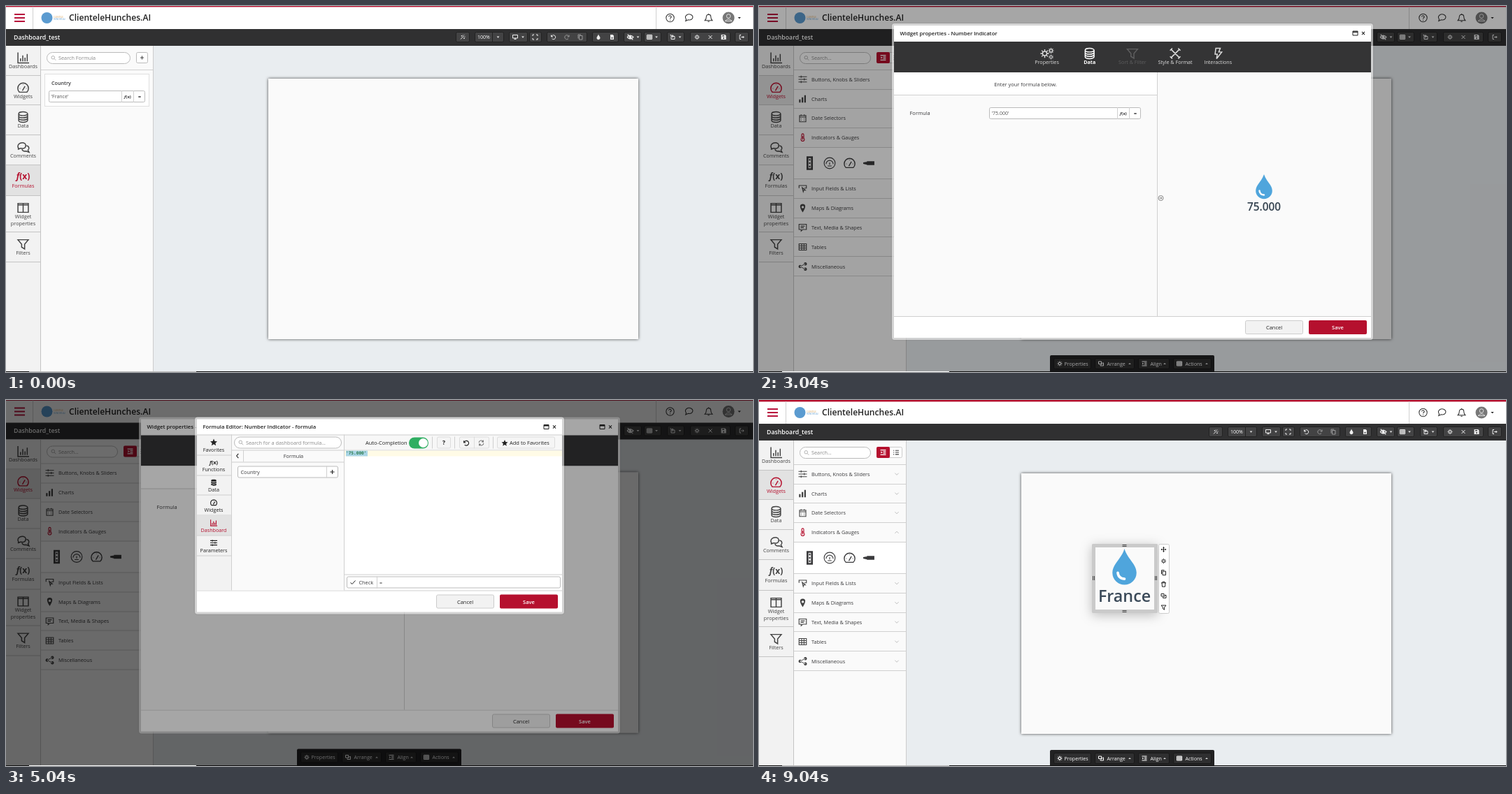
An HTML page that plays this animation: 1068 by 524 pixels, repeating every 10 s.

```html
<!DOCTYPE html>
<html lang="en">
<head>
<meta charset="utf-8">
<title>Dashboard formula</title>
<style>
  html, body { margin: 0; width: 100%; height: 100%; overflow: hidden; }
  svg { display: block; width: 1068px; height: 524px; font-family: "Open Sans", sans-serif; white-space: pre; }
  .mono { font-family: "DejaVu Sans Mono", monospace; }
</style>
</head>
<body>
<svg id="stage" viewBox="0 0 1068 524"></svg>
<script>
const RED = '#b5102e', INK = '#3a3a3c', LINE = '#d0d0d0', GREY = '#8a8a8a';

// Icons are drawn in a 16 x 16 box; a leading "*" means filled.
const ICONS = {
  chart: 'M1 1V15H16M4.5 13V9M7.5 13V5M10.5 13V8M13.5 13V3',
  bars: '*M1 9H4V15H1ZM6 5H9V15H6ZM11 1H14V15H11Z',
  gauge: 'M3 14A7.2 7.2 0 1 1 13 14ZM7 12L10.5 6M3.5 9H4M8 3.5V4M12 9H12.5',
  db: 'M2 3.5a6 2.5 0 1 0 12 0a6 2.5 0 1 0-12 0V12.5a6 2.5 0 0 0 12 0V3.5M2 6.5a6 2.5 0 0 0 12 0M2 9.5a6 2.5 0 0 0 12 0',
  dbFill: '*M2 3C2 .5 14 .5 14 3V4.5C14 6.500 2 6.500 2 4.500ZM2 6.300C4 8 12 8 14 6.300V9C14 11 2 11 2 9ZM2 10.800C4 12.500 12 12.500 14 10.800V13.500C14 16 2 16 2 13.500Z',
  comments: 'M2 10C-3 3 10-1 11.500 5C12 10 7 10.500 5 9.500L1 11ZM12.500 6C17 7 16 11 14.500 12L16 15L12 13.500C9 14 7 13 6.500 11',
  chat: 'M2.500 10.500C-2 4 6 0 11 2.500C17 6 13 13 6 11.500L1.500 13.500Z',
  columns: 'M1 2H15V14H1ZM8 2V14M1 4H15',
  filter: 'M1 2H15L10 8V14.500L6 12V8Z',
  search: 'M2 6.500a4.500 4.500 0 1 0 9 0a4.500 4.500 0 1 0-9 0M10 10L14.500 14.500',
  gear: 'M4.500 8a3.500 3.500 0 1 0 7 0a3.500 3.500 0 1 0-7 0M8 1V4M8 12V15M1 8H4M12 8H15M3 3L5 5M11 11L13 13M13 3L11 5M5 11L3 13',
  wand: 'M2 14L11 5M9 2V4M13 7H15M13 2L12 3M5 3V6M3.500 4.500H6.500M12 10V13M10.500 11.500H13.500',
  caret: '*M3 5.500H13L8 11Z',
  caretUp: '*M3 10.500H13L8 5Z',
  monitor: 'M1 2H15V11H1ZM8 11V14M5 14H11',
  expand: 'M1 5V1H5M11 1H15V5M15 11V15H11M5 15H1V11',
  undo: 'M2 2V7H7M2.500 7A6 6 0 1 1 4 12.500',
  redo: 'M14 2V7H9M13.500 7A6 6 0 1 0 12 12.500',
  refresh: 'M2 7A6 6 0 0 1 13 4.500V1M13 5H9M14 9A6 6 0 0 1 3 11.500V15M3 11H7',
  copy: 'M5 4H14V15H5ZM2 12V1H10',
  drop: '*M8 0C10 5 13 7 13 10.500C13 17 3 17 3 10.500C3 7 6 5 8 0Z',
  image: '*M3 1H10L13 4V15H3ZM5 12H11L9 8L7 10L6 9Z',
  eye: 'M1 8Q8 0 15 8Q8 16 1 8M6 8a2 2 0 1 0 4 0a2 2 0 1 0-4 0M2 2L14 14',
  table: 'M1 2H15V14H1ZM1 6H15M1 10H15M6 2V14M10.500 2V14',
  share: 'M5 6H14V14H4V2H1M8 10V3M5.500 5L8 2L10.500 5',
  close: 'M3 3L13 13M13 3L3 13',
  save: '*M1 1H12L15 4V15H1ZM4 3V6H10V3ZM8 9a2 2 0 1 0 .1 0Z',
  exit: 'M6 2H2V14H6M6 8H14M11 5L14 8L11 11',
  help: 'M1 8a7 7 0 1 0 14 0a7 7 0 1 0-14 0M5.500 6C6 3 11 4 10 7Q8 8 8 9.500M8 11.500V12.500',
  bell: 'M1.500 12.500Q4 10 4 6.500A4 4.500 0 0 1 12 6.500Q12 10 14.500 12.500ZM6.500 14.500H9.500M8 .5V2',
  sliders: 'M0 3H16M0 8H16M0 13H16M5 1V5M11 6V10M5 11V15',
  calendar: 'M2 3H14V15H2ZM2 6H14M5 1V4M11 1V4M5 9H6M10 9H11M5 12H6M10 12H11',
  thermo: 'M6 9V2.500a2 2 0 0 1 4 0V9a3.200 3.200 0 1 1-4 0M8 5V12',
  input: 'M1 7V2H15V7H11M7 6L13 11L10 11L9 14Z',
  pin: '*M8 0C15 0 14 7 8 16C2 7 1 0 8 0ZM8 3.500a2.300 2.300 0 1 0 .1 0Z',
  note: 'M1 2H15V12H8L5 15V12H1ZM4 5.500H12M4 8.500H10',
  nodes: '*M3 5a3 3 0 1 0 .1 0ZM13 0a3 3 0 1 0 .1 0ZM13 10a3 3 0 1 0 .1 0ZM3 7.400L13 2.400V3.600L4 8L13 12.400V13.600L3 8.600Z',
  list: 'M1 3H3M6 3H15M1 8H3M6 8H15M1 13H3M6 13H15',
  indent: 'M1 2H15M8 6H15M8 10H15M1 14H15M2 6L5 8L2 10',
  down: 'M2 5L8 11L14 5', up: 'M2 11L8 5L14 11', right: 'M5 1L11 8L5 15', left: 'M11 1L5 8L11 15',
  plus: 'M8 1V15M1 8H15',
  bolt: 'M5 1H11L9 6H13L6 15L7 9H4Z',
  tools: 'M2 2L14 14M14 2L2 14M1 4L4 1M12 15L15 12M12 1L15 4M1 12L4 15M5 11L11 5',
  star: '*M8 0L10.300 5.500L16 6L11.700 9.800L13 15.500L8 12.500L3 15.500L4.300 9.800L0 6L5.700 5.500Z',
  check: 'M1 9L6 13L15 3',
  window: 'M1 2H15V14H1ZM1 4H15M1 5H15',
  sort: 'M4 1V14M1 11L4 14L7 11M10 2H14M10 6H14M10 10H14L10 14H14',
  goto: 'M1 8a7 7 0 1 0 14 0a7 7 0 1 0-14 0M4 8H11M8 5L11 8L8 11',
  move: 'M8 1V15M1 8H15M6 3L8 1L10 3M6 13L8 15L10 13M3 6L1 8L3 10M13 6L15 8L13 10',
  trash: 'M1 4H15M5 4V1H11V4M3 4L4 15H12L13 4',
  layers: 'M1 2H9V9H1ZM6 11V14H15V6H11M9 11L12 8',
  light: 'M5 0H11V16H5ZM7 3.500H9M7 8H9M7 12.500H9',
  dial: 'M1 8a7 7 0 1 0 14 0a7 7 0 1 0-14 0M3.500 9A4.500 4.500 0 0 1 12.500 9M5.500 11.500H10.500M8 7V10',
  pen: '*M0 7L5 6V10L0 9ZM5 5.500H15V10.500H5Z'
};

function icon(name, cx, cy, size = 9, color = INK, weight = 1.5) {
  const d = ICONS[name], k = size / 16, solid = d[0] === '*';
  return `<path transform="translate(${cx - size / 2} ${cy - size / 2}) scale(${k})" d="${solid ? d.slice(1) : d}" ` +
    (solid ? `fill="${color}" fill-rule="evenodd"/>` : `fill="none" stroke="${color}" stroke-width="${weight}"/>`);
}
function box(x1, y1, x2, y2, fill, stroke, r = 0, more = '') {
  const o = stroke ? .5 : 0;
  return `<rect x="${x1 + o}" y="${y1 + o}" width="${x2 - x1 - 2 * o}" height="${y2 - y1 - 2 * o}" rx="${r}" fill="${fill}" ${stroke ? `stroke="${stroke}"` : ''} ${more}/>`;
}
const hLine = (x1, x2, y, c = LINE) => box(x1, y, x2, y + 1, c);
const vLine = (x, y1, y2, c = LINE) => box(x, y1, x + 1, y2, c);
// cy is the middle of the capital letters
function text(x, cy, s, size = 7.3, fill = INK, weight = 400, anchor = 'start', more = '') {
  return `<text x="${x}" y="${cy + size * .36}" font-size="${size}" fill="${fill}" font-weight="${weight}" text-anchor="${anchor}" ${more}>${s}</text>`;
}
const mid = (x, cy, s, size, fill, weight) => text(x, cy, s, size, fill, weight, 'middle');
const fx = (x, cy, size, color = INK) => mid(x, cy, '<tspan font-style="italic">f</tspan>(x)', size, color, 700);
const search = (x1, y1, x2, hint, fill = '#fff') =>
  box(x1, y1, x2, y1 + 17, fill, '#bbb', 8) + icon('search', x1 + 10, y1 + 8.5, 8, GREY, 1.3) + text(x1 + 17, y1 + 8.5, hint, 7.3, GREY);

function formulaInput(x1, y, x2, value) {
  return box(x1, y, x2 + 33, y + 17, '#fff', '#bbb', 2) + vLine(x2 - 1, y, y + 17) + vLine(x2 + 16, y, y + 17) +
    text(x1 + 3.5, y + 8.5, value, 7, '#555') + fx(x2 + 8, y + 8.5, 6) + mid(x2 + 25, y + 8.5, '=', 7, INK, 700);
}

function header() {
  const light = '#eee';
  let s = box(0, 0, 1068, 34, '#fff') + box(0, -2, 1068, 1.4, RED) + vLine(38, 1, 33) + vLine(929, 1, 33);
  for (const y of [11, 16, 21]) s += box(12, y, 27, y + 2, '#b8143c');
  s += '<circle cx="58.500" cy="17" r="8" fill="#5b9bd0"/>' + text(68, 15.5, 'CLIENTELE', 2.8, '#dba45c') + text(68, 19, 'HUNCHES.AI', 2.8, '#5b9bd0') +
    text(90, 17, 'ClienteleHunches.AI', 12.1, '#222', 600) +
    icon('help', 949.5, 17, 13, '#333', 1.3) + icon('chat', 977, 17, 13, '#333', 1.3) + icon('bell', 1004.5, 17, 13, '#333', 1.3) +
    '<circle cx="1033" cy="17" r="8.500" fill="#777"/><circle cx="1033" cy="14.500" r="2.800" fill="none" stroke="#ddd"/><path d="M1028 21.500Q1033 16 1038 21.500Z" fill="none" stroke="#ddd"/>' +
    icon('caret', 1048.5, 17, 7, '#222');
  s += box(0, 33, 1068, 57, '#303031') + text(11, 44.5, 'Dashboard_test', 8.75, '#fff', 600);
  for (const [a, b] of [[643, 663], [670, 712], [719, 746], [748, 766], [773, 831], [838, 876], [883, 909], [912, 937], [945, 970], [978, 1036], [1042, 1062]])
    s += box(a, 37, b, 52, '#434344', '#222', 2);
  s += text(674, 44.5, '100%', 7, '#fff') + vLine(695, 38, 51, '#222');
  const tools = { wand: 653, monitor: 728, expand: 756.5, undo: 782.5, redo: 802, copy: 821, drop: 847, image: 866.5, eye: 892.5, table: 920, share: 953, gear: 988, close: 1007, save: 1026, exit: 1052 };
  for (const name in tools) s += icon(name, tools[name], 44.5, name === 'eye' ? 10 : 8, /redo|copy/.test(name) ? '#999' : light, 2);
  for (const x of [703.5, 739, 903.5, 930, 963.5]) s += icon('caret', x, 44.5, 6, light);
  return s;
}

function sidebar(active) {
  const items = [['Dashboards', 'chart', 57, 100], ['Widgets', 'gauge', 100, 142], ['Data', 'db', 142, 185], ['Comments', 'comments', 185, 228],
    ['Formulas', '', 228, 272], ['Widget', 'columns', 272, 324], ['Filters', 'filter', 324, 367]];
  let s = box(0, 57, 50, 524, '#f2f2f2');
  for (const [name, glyph, a, b] of items) {
    const on = name === active, c = on ? RED : '#444';
    if (on) s += box(0, a, 50, b, '#e2e2e2');
    s += hLine(0, 50, b - 1, '#c4c4c4') + (glyph ? icon(glyph, 24.5, a + 17, 17, c, 1.4) : fx(24.5, a + 16, 12, c)) + mid(24.5, a + 29.3, name, 7.3, c);
  }
  return s + mid(24.5, 311, 'properties', 7.3, '#444') + vLine(49, 57, 524, '#c4c4c4');
}

function formulaPanel() {
  return search(58, 66, 178, 'Search Formula') + box(186, 66, 203, 82, '#fff', '#bbb', 2) + icon('plus', 194.5, 74, 6, INK, 2.5) + hLine(50, 211, 91) +
    box(55, 97, 205, 144, '#fff', '#e0e0e0') + text(65, 110, 'Country', 7.2, INK, 600) + formulaInput(61, 121, 166, "'France'");
}

function widgetPanel() {
  const rows = [['sliders', 'Buttons, Knobs &amp; Sliders', 105], ['bars', 'Charts', 133], ['calendar', 'Date Selectors', 160.5], ['thermo', 'Indicators &amp; Gauges', 188.5],
    ['input', 'Input Fields &amp; Lists', 261.5], ['pin', 'Maps &amp; Diagrams', 289.5], ['note', 'Text, Media &amp; Shapes', 317], ['table', 'Tables', 345], ['nodes', 'Miscellaneous', 373]];
  let s = search(58, 66, 160, 'Search...') + box(168, 66, 205, 82, '#fff', '#ccc', 2) + box(168, 66, 187, 82, RED, null, 2) +
    icon('indent', 177.5, 74, 9, '#fff', 2) + icon('list', 196, 74, 9, INK, 2) + box(50, 203, 211, 247, '#fff');
  for (const y of [91, 119, 146, 174, 202, 247, 275, 303, 330, 358, 386]) s += hLine(50, 211, y);
  for (const [glyph, name, y] of rows) {
    const open = glyph === 'thermo';
    s += icon(glyph, 62.5, y, 12, open ? RED : '#444') + text(75, y, name) + icon(open ? 'up' : 'down', 197, y, 7, '#999', 1.4);
  }
  return s + icon('light', 72.5, 225, 17, INK, 2.5) + icon('dial', 101, 225, 18, INK, 1) + icon('gauge', 129.5, 225, 17, INK, 1.3) + icon('pen', 157.5, 225, 17);
}

function bottomBar() {
  let s = box(416, 500, 651, 526, '#222223', null, 2);
  for (const [a, b, glyph, name] of [[421, 475, 'gear', 'Properties'], [480, 537, 'layers', 'Arrange'], [542, 587, 'indent', 'Align'], [592, 647, 'table', 'Actions']])
    s += box(a, 504, b, 520, '#2f2f30', '#191919', 2) + icon(glyph, a + 9, 512, 8, '#fff', 2) + text(a + 15.5 + (a > 475 ? 2 : 0), 512, name, 7.1, '#fff') +
      (a > 475 ? icon('caretUp', b - 7, 512, 6, '#ddd') : '');
  return s;
}

const waterDrop = (x, y, k) => `<g transform="translate(${x} ${y}) scale(${k})"><path d="M0 0C3 10 11.800 15 11.800 23.500A11.800 11.800 0 0 1-11.800 23.500C-11.800 15-3 10 0 0Z" fill="#4fa5dc"/><path d="M-6.500 23.500Q-6 29 0 29.500" fill="none" stroke="#fff" stroke-width="2.500" stroke-linecap="round"/></g>`;

function widget() {
  let s = box(476, 205, 570, 304, '#c9c9c9', null, 2, 'filter="url(#soft)"') + box(476, 205, 570, 304, '#cacaca', null, 2) + box(481, 210, 565, 299, '#fafafa') +
    waterDrop(522.5, 212, 1.46) + mid(522.5, 280, 'France', 23.3, '#3b4a59', 600) + box(571, 205, 587, 305, '#fff', '#ccc', 2);
  for (const y of [206, 208, 300, 302]) s += hLine(519.5, 525.5, y, '#444');
  for (const x of [477, 479, 566, 568]) s += vLine(x, 251, 257, '#444');
  ['move', 'gear', 'copy', 'trash', 'layers', 'filter'].forEach((g, i) => s += icon(g, 578.5, 213 + i * 16.6, 8, '#222', 2));
  return s;
}

function frame(x1, y1, x2, y2, title) {
  return box(x1 - 3, y1 - 3, x2 + 3, y2 + 3, 'rgba(255,255,255,.55)', null, 4, 'filter="url(#edge)"') + box(x1, y1, x2, y2, '#fff') +
    text(x1 + 8.5, 39, title, 7.7, '#222', 600) + icon('window', x2 - 22.5, 39, 8, '#222', 2) + icon('close', x2 - 11, 39, 6.5, '#222', 2.5) +
    hLine(x1, x2, y2 - 31) + box(x2 - 180, y2 - 25, x2 - 97, y2 - 5, '#f2f2f2', '#ccc', 2) + mid(x2 - 138.5, y2 - 14.5, 'Cancel', 7.5, '#222') +
    box(x2 - 89, y2 - 25, x2 - 6, y2 - 5, RED, null, 2) + mid(x2 - 47.5, y2 - 14.5, 'Save', 7.5, '#fff', 600);
}

function dataBody() {
  return box(193, 95, 569, 444, '#fff') + box(199, 100, 354, 118, '#fff', '#bbb', 2) + vLine(336, 100, 118) + text(206, 109, 'Select a Datasource...', 6.9, GREY) +
    icon('dbFill', 344.5, 109, 8) + box(358, 100, 376, 118, '#fff', '#ccc', 2) + icon('gear', 367, 109, 8, INK, 2) +
    search(199, 129, 337, 'Search...', '#eee') + box(342, 129, 376, 146, '#fff', '#ccc', 2) + box(342, 129, 359, 146, '#d3667f', null, 2) +
    icon('list', 350.5, 137.5, 8, '#fff', 2) + icon('sort', 367, 137.5, 8, INK, 1.7) + hLine(193, 381, 151) + hLine(193, 381, 418) +
    box(196, 422, 378, 441, '#fafafa', '#ccc', 2) + mid(287, 431.5, 'Add Calculated Column', 7.7, '#777') +
    vLine(381, 95, 444) + mid(475, 103.5, 'Values', 7.3, INK, 600) + hLine(381, 569, 111) + mid(475, 278.5, 'Drop quantities, amounts, and values here.', 7.1, GREY);
}

function formulaBody(value) {
  return box(193, 95, 569, 128, '#fff') + hLine(193, 569, 127) + mid(381, 112, 'Enter your formula below.', 7.4) +
    text(215.5, 153.5, 'Formula', 7.5) + formulaInput(329, 145, 513, value);
}

function propertiesDialog({ data, value, shown }) {
  let s = frame(193, 28, 875, 475, 'Widget properties - Number Indicator') + box(193, 51, 875, 95, '#343435') + box(193, 95, 875, 444, '#fafafa');
  [['Properties', 'gear'], ['Data', 'db'], ['Sort &amp; Filter', 'filter'], ['Style &amp; Format', 'tools'], ['Interactions', 'bolt']].forEach(([name, glyph], i) => {
    const x = 411.5 + i * 61.2, c = ['#ddd', '#fff', '#5e5e5f'][i < 3 ? i : 0];
    s += (i ? icon(glyph, x, 68, 17, c, 1.4) : icon(glyph, x - 3, 68, 14, c, 1.6) + icon(glyph, x + 6, 64, 9, c, 2) + icon(glyph, x + 6, 73, 8, c, 2)) +
      mid(x, 80.5, name, 7.2, c, i === 1 ? 700 : 400);
  });
  return s + (data ? dataBody() : formulaBody(value)) + vLine(569, 95, 444) + icon('goto', 574.5, 275, 8, '#666', 1.6) +
    waterDrop(722, 241, 1) + mid(722, 287, shown, 15.4, '#34424f', 600);
}

function editorDialog({ list, added, checked }) {
  let s = frame(273, 28, 795, 304, 'Formula Editor: Number Indicator - formula') + box(273, 50, 323, 273, '#f2f2f2') + box(323, 50, 484, 273, '#fafafa') + box(484, 50, 795, 72, '#f7f7f7');
  ['Favorites:star', 'Functions:', 'Data:dbFill', 'Widgets:gauge', 'Dashboard:chart', 'Parameters:sliders'].forEach((item, i) => {
    const [name, glyph] = item.split(':'), y = 50 + i * 28.8, c = i === 4 ? RED : '#222';
    if (i === 4) s += box(273, y, 322, y + 29, '#e2e2e2');
    s += hLine(273, 322, Math.round(y + 28.8)) + (glyph ? icon(glyph, 297, y + 11, 10, c, 1.8) : fx(297, y + 11, 7.5, c)) + mid(297, y + 21.5, name, 7.2, c);
  });
  s += hLine(273, 795, 50) + vLine(322, 50, 273) + vLine(483, 50, 273) + search(326, 53, 480, 'Search for a dashboard formula...');
  s += list
    ? hLine(323, 484, 72) + hLine(323, 484, 89) + vLine(339, 72, 89) + icon('left', 331, 80.5, 7, '#222', 2.5) + mid(411, 80.5, 'Formula', 7.3) +
      box(331, 95, 475, 112, '#fff', '#bbb', 2) + vLine(458, 95, 112) + text(335.5, 103.5, 'Country', 7.3) + icon('plus', 466.5, 103.5, 7, '#222', 2.5)
    : text(331, 84, 'Formulas', 7.3) + icon('right', 466, 84, 7, '#222', 2.5) + hLine(331, 475, 92);
  s += text(514, 61.5, 'Auto-Completion', 7.5, '#222') + box(576, 54, 604, 70, '#2fae62', null, 8) + '<circle cx="596.500" cy="62" r="6.500" fill="#fff"/>' +
    box(616, 53, 636, 70, '#f5f5f5', '#ddd', 2) + mid(626, 61.5, '?', 8.5, '#222', 700) + box(648, 53, 691, 70, '#f5f5f5', '#ddd', 2) + vLine(669, 53, 70, '#ddd') +
    icon('undo', 658, 62, 9, '#222', 2) + icon('refresh', 679.5, 62, 9, '#777', 2) + box(702, 53, 785, 70, '#f5f5f5', '#ddd', 2) +
    icon('star', 713, 62, 9, '#222') + text(720, 61.5, 'Add to Favorites', 7.5, '#222');
  for (const x of [609, 641, 696]) s += vLine(x, 53, 70);
  s += hLine(484, 795, 72) + box(484, 73, 795, 81, '#fffbe6');
  const code = added
    ? `<tspan fill="#2d5c88">DashboardFormula</tspan>(<tspan fill="#2f8a3c">'Country'</tspan>)`
    : `'75.000'`;
  s += (added ? vLine(585, 73, 80, '#333') : box(486, 73, 517, 81, '#a9d5e6')) + text(486, 76.7, code, 6.12, added ? '#333' : '#2a7a4a', 700, 'start', 'class="mono"');
  return s + hLine(484, 795, 250) + box(487, 253, 793, 270, '#fff', '#bbb', 2) + vLine(530, 253, 270) + icon('check', 496, 261.5, 8, '#222', 2) +
    text(504.5, 262, 'Check', 7.3) + text(534, 262, checked ? '= France' : '=', 7, '#222');
}

const FILTERS = `<defs>
  <filter id="page" x="-5%" y="-5%" width="110%" height="110%"><feDropShadow dx="0" dy="0" stdDeviation="2" flood-opacity=".7"/></filter>
  <filter id="soft" x="-40%" y="-40%" width="180%" height="180%"><feDropShadow dx="0" dy="3" stdDeviation="8" flood-opacity=".25"/></filter>
  <filter id="edge"><feDropShadow dx="0" dy="0" stdDeviation="1" flood-opacity=".3"/></filter></defs>`;
const shade = () => box(0, -2, 1068, 527, 'rgba(0,0,0,.35)');

function draw(s) {
  const view = header() + sidebar(s.home ? 'Formulas' : 'Widgets') + box(50, 57, 211, 524, '#fafafa') + vLine(49, 57, 524, '#c4c4c4') +
    (s.home ? formulaPanel() : widgetPanel()) + vLine(210, 57, 524, '#ccc') +
    box(375, 104, 904, 477, '#fafafa', null, 0, 'filter="url(#page)"') +
    (s.home ? '' : (s.dialog ? '' : widget()) + bottomBar()) +
    (s.dialog ? shade() + propertiesDialog(s) : '') + (s.editor ? shade() + editorDialog(s) : '');
  return FILTERS + box(0, 0, 1068, 524, '#e9edf0') + `<g transform="translate(0 ${s.shift || 0})">${view}</g>` +
    box(0, 523, 1068, 524, '#111') + box(33, 523, 272, 524, s.lit ? '#fff' : '#bbb');
}

const formula = { dialog: true, lit: true, value: "'75.000'", shown: '75.000' };
const editor = { ...formula, editor: true };
const picked = { ...editor, list: true, shift: -.5 };
const STEPS = [
  [0, { home: true }],
  [1040, { dialog: true, data: true, shown: '75000' }],
  [2040, formula],
  [4040, editor],
  [5040, picked],
  [6040, { ...picked, added: true }],
  [7040, { ...picked, added: true, checked: true }],
  [8040, { dialog: true, value: "DashboardFormula('Country')", shown: 'France', shift: 1 }],
  [9040, { shift: 1 }]
];

const stage = document.getElementById('stage');
let current;
function tick() {
  const t = performance.now() % 10000;
  const step = STEPS.findLast(([start]) => t >= start);
  if (step !== current) {
    current = step;
    stage.innerHTML = draw(step[1]);
  }
  requestAnimationFrame(tick);
}
tick();
</script>
</body>
</html>
```
